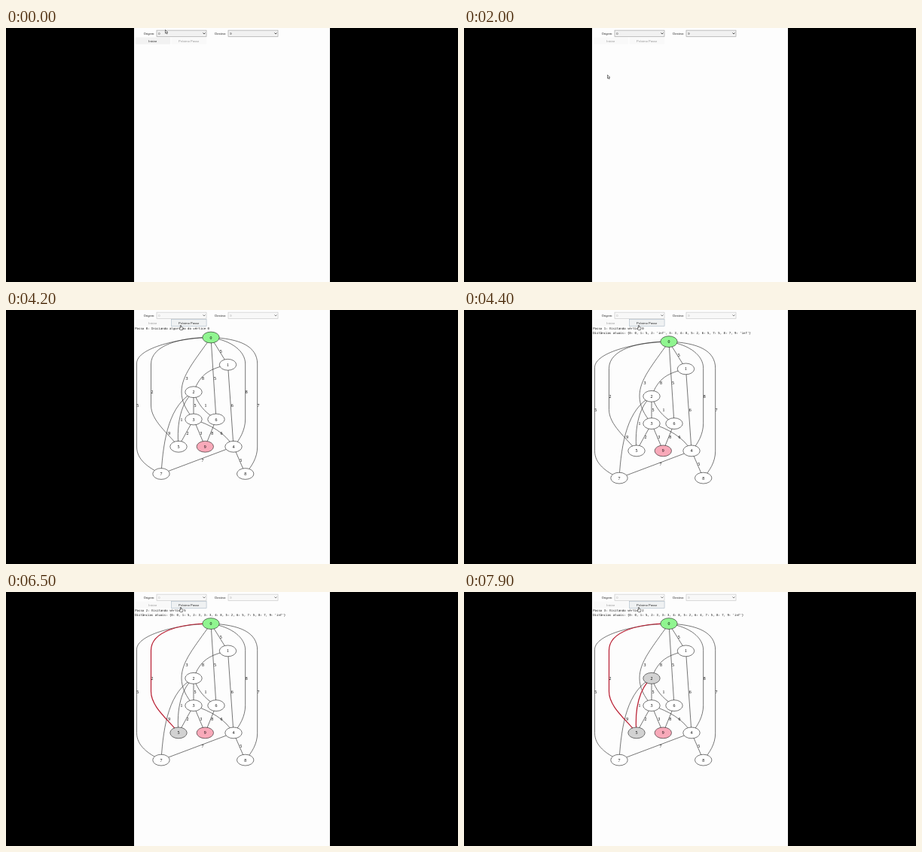
Write an HTML page that moves like this. It is 600 px wide and 338 px high and loops after 8 s.

```html
<!DOCTYPE html>
<html lang="pt">
<head>
<meta charset="utf-8">
<style>
  html, body { margin: 0; height: 100%; overflow: hidden; background: #000; }
  svg { display: block; width: 600px; height: 338px; }
  .ui { font: 4.05px "Liberation Sans", Arial, sans-serif; }
  .log { font: 4.01px "DejaVu Sans Mono", monospace; white-space: pre; fill: #111; }
  .graph { font: 5.9px "Liberation Serif", Times, serif; text-anchor: middle; }
  .graph path { fill: none; stroke: #1c1c1c; stroke-width: .6; }
  .graph path.hot { stroke: #b81c30; stroke-width: 1.2; }
  .graph ellipse { fill: #fff; stroke: #1c1c1c; stroke-width: .6; }
  .mid { text-anchor: middle; }
</style>
</head>
<body>
<svg id="stage" viewBox="0 0 600 338"></svg>
<script>
const PERIOD = 8000;
const stage = document.getElementById('stage');

const nodes = [[272, 36.5], [294.5, 72.8], [249, 109.2], [249, 145.5], [302, 181.8],
  [229, 181.8], [279, 145.5], [206, 218], [317.7, 218], [264.3, 181.8]];

// from, to, weight; the label sits just right of the middle
const straight = [[0, 1, 5], [0, 6, 5], [1, 4, 6], [2, 3, 5], [3, 5, 2], [3, 9, 3],
  [6, 9, 8], [4, 7, 7], [4, 8, 5]];

// from, to, weight, label x, label y, route between the two centres
const curved = [
  [0, 3, 3, 240, 91, 'C250 68 233 87 233 109C233 122 239 133'],
  [1, 2, 8, 261.5, 91, 'C272 78 258 84'],
  [2, 6, 1, 265, 127.3, 'C255 125 262 135'],
  [2, 5, 1, 233, 145.5, 'C233 122 226 150'],
  [2, 7, 9, 216.8, 163.6, 'C217 126 209 170'],
  [3, 4, 6, 286, 163.6, 'C272 153 290 163'],
  [0, 7, 5, 174.8, 127.3, 'C232 37 173.5 50 173.5 71V182C173.5 199 189 210'],
  [0, 5, 2, 194, 109.2, 'C232 36 192.5 47 192.5 72V127C192.5 147 215 164'],
  [0, 4, 8, 319.2, 109.2, 'C300 41 317.7 55 317.7 72V145C317.7 160 310 173'],
  [0, 8, 7, 335, 127.3, 'C310 38 333.7 48 333.7 72V182C333.7 197 326 208']
];
const edges = curved.concat(straight.map(([a, b, w]) => {
  const shift = w === 7 ? 7 : 2;
  return [a, b, w, (nodes[a][0] + nodes[b][0]) / 2 + shift, (nodes[a][1] + nodes[b][1]) / 2, 'L'];
}));

const distances = (d2, d6) =>
  `Distâncias atuais: {0: 0, 1: 5, 2: ${d2}, 3: 3, 4: 8, 5: 2, 6: ${d6}, 7: 5, 8: 7, 9: 'inf'}`;

const steps = [
  { at: 2100, draw: 2100, log: ['Passo 0: Iniciando algoritmo do vértice 0'], path: [] },
  { at: 4300, draw: 4400, log: ['Passo 1: Visitando vértice 0', distances("'inf'", 5)], path: [] },
  { at: 6000, draw: 6000, log: ['Passo 2: Visitando vértice 5', distances(3, 5)], path: [5] },
  { at: 7100, draw: 7300, log: ['Passo 3: Visitando vértice 2', distances(3, 4)], path: [5, 2] }
];

// start time, x, y, pointing hand
const pointer = [[0, 211.5, 2.5, 0], [100, 203, 9, 0], [200, 196, 16, 1], [1000, 196, 19, 1],
  [1700, 194, 36, 0], [1800, 191, 56, 0], [1900, 190.5, 62.5, 0], [2700, 211, 25, 0],
  [2900, 225, 20, 1], [3000, 232, 20, 1]];

const latest = (list, t, key) => list.filter(item => item[key] <= t).pop();

const text = (x, y, s, attrs = '') => `<text x="${x}" y="${y}" ${attrs}>${s}</text>`;

const rect = (x, y, w, h, fill, stroke = 'none') =>
  `<rect x="${x}" y="${y}" width="${w}" height="${h}" fill="${fill}" stroke="${stroke}" stroke-width=".6"/>`;

function select(x, label, value, disabled) {
  const ink = disabled ? '#aaa' : '#222';
  return text(x - 2.8, 8.7, label, 'text-anchor="end" fill="#222"') +
    rect(x, 3.1, 66, 8.2, disabled ? '#f8f8f8' : '#f1f1f1', disabled ? '#c4c4c4' : '#999') +
    text(x + 2.3, 8.7, value, `fill="${ink}"`) +
    `<path d="M${x + 61.5} 6.4l1.5 1.6 1.5-1.6" fill="none" stroke="${disabled ? '#666' : '#222'}" stroke-width=".8"/>`;
}

function button(x, label, { enabled, hover, focus }) {
  const shadow = hover ? rect(x + .3, 13.2, 46.8, 9, '#ddd') : '';
  const fill = !enabled ? '#f9f9f9' : hover ? '#e9e9e9' : focus ? '#eff1f2' : '#f2f2f2';
  return shadow + rect(x, 12.5, 46.8, 9, fill, focus ? '#a9b9c6' : 'none') +
    text(x + 23.4, 18.5, label, `class="mid" fill="${enabled ? '#222' : '#949494'}"`);
}

function graph(path, dy) {
  const isHot = (a, b) => (a === 0 && b === 5 && path.includes(5)) ||
    (a === 2 && b === 5 && path.includes(2));
  const lines = edges.map(([a, b, w, x, y, route]) =>
    `<path ${isHot(a, b) ? 'class="hot"' : ''} d="M${nodes[a]} ${route} ${nodes[b]}"/>` +
    text(x, y + 2, w));
  const dots = nodes.map(([x, y], i) => {
    const fill = i === 0 ? '#90f590' : i === 9 ? '#f8a9b9' : path.includes(i) ? '#d2d2d2' : '#fff';
    return `<ellipse cx="${x}" cy="${y}" rx="11.2" ry="7.4" style="fill:${fill}"/>` + text(x, y + 2, i);
  });
  return `<g class="graph" transform="translate(0 ${dy})">${lines.join('')}${dots.join('')}</g>`;
}

function cursor([, x, y, hand]) {
  const shape = hand
    ? 'M-.6 .6Q0-.3 .6 .6V2.6L2.6 3.1Q3.1 3.3 2.9 4.4L2.3 6.6H-.7L-2.3 4.3Q-2.3 3.3-.6 4.2Z'
    : 'M0 0V4.6L1.1 3.6 1.9 5.4 2.7 5 1.9 3.3H3.3Z';
  return `<path transform="translate(${x} ${y})" d="${shape}" fill="#fff" stroke="#222" stroke-width=".6"/>`;
}

function render(t) {
  const step = latest(steps, t, 'at');
  const started = Boolean(step);
  let out = rect(170, 0, 260, 338, '#fdfdfd') + '<g class="ui">' +
    select(200, 'Origem:', 0, started) + select(295, 'Destino:', 9, started) +
    button(171.3, 'Iniciar', { enabled: t < 1300, hover: t >= 200 && t < 1300 }) +
    button(219.3, 'Próximo Passo',
      { enabled: started, hover: t >= 2900 && t < 3500, focus: t >= 3500 }) + '</g>';
  if (started) {
    out += step.log.map((line, i) => text(171.2, 26.4 + 5.6 * i, line, 'class="log"')).join('');
    if (t >= step.draw) out += graph(step.path, 5.6 * (step.log.length - 1));
  }
  stage.innerHTML = out + cursor(latest(pointer, t, 0));
}

function tick() {
  render(performance.now() % PERIOD);
  requestAnimationFrame(tick);
}
tick();
</script>
</body>
</html>
```
